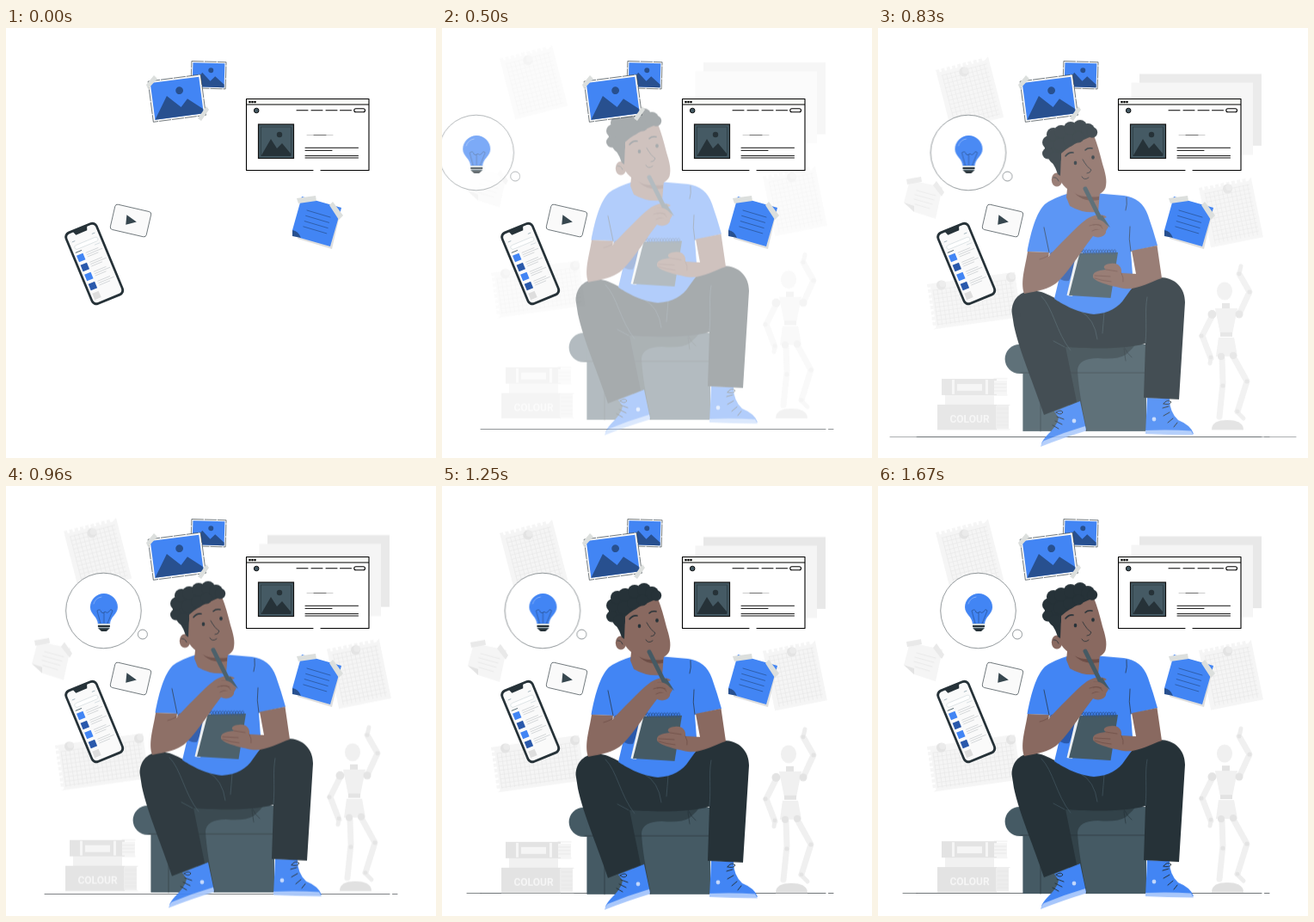
Write an HTML page that moves like this. It is 500 by 500 pixels and loops after 1710 ms.

```html
<!DOCTYPE html>
<html lang="en">
<head>
<meta charset="utf-8">
<title>Ideas</title>
<style>
  html, body { margin: 0; width: 100%; height: 100%; overflow: hidden; background: #fff; }
  svg { display: block; width: 500px; height: 500px; }
  .ln { fill: none; stroke-linecap: round; stroke-linejoin: round; }
  .book { font: bold 12px Roboto, 'Open Sans', sans-serif; font-stretch: 75%; }
</style>
</head>
<body>
<svg id="stage" viewBox="0 0 500 500" xmlns="http://www.w3.org/2000/svg"></svg>
<script>
const LOOP = 1710;
const BLUE = '#4285f4', DEEP = '#2a59ab', NAVY = '#28508f';
const INK = '#263238', SLATE = '#455a64', SKIN = '#896960', SHADE = '#6c4d46';
const PALE = '#f5f5f5', GRAY = '#e3e3e3', TAPE = '#dcdfdd';

// Markup helpers
const path = (d, fill, more = '') => `<path d="${d}" fill="${fill}" ${more}/>`;
const line = (d, color, w = 0.7, more = '') =>
  `<path class="ln" d="${d}" stroke="${color}" stroke-width="${w}" ${more}/>`;
const rect = (x, y, w, h, fill, more = '') =>
  `<rect x="${x}" y="${y}" width="${w}" height="${h}" fill="${fill}" ${more}/>`;
const dot = (x, y, r, fill, more = '') => `<circle cx="${x}" cy="${y}" r="${r}" fill="${fill}" ${more}/>`;
const oval = (x, y, rx, ry, fill) => `<ellipse cx="${x}" cy="${y}" rx="${rx}" ry="${ry}" fill="${fill}"/>`;
const at = (x, y, deg, body) => `<g transform="translate(${x} ${y}) rotate(${deg})">${body}</g>`;
const layer = (id, body) => `<g id="${id}">${body}</g>`;
const times = (n, f) => Array.from({ length: n }, (_, i) => f(i)).join('');

// Squared paper with a torn edge on the top or the left
function paper(x, y, w, h, deg, side) {
  const step = 6.4, n = Math.floor((side === 'top' ? w : h) / step);
  const torn = times(n, i => {
    const a = (i * step).toFixed(1), b = (i * step + 4).toFixed(1);
    return side === 'top' ? `L${a} 0L${b} 0L${b} 3.5L${+a + step} 3.5` : `L0 ${a}L0 ${b}L3.5 ${b}L3.5 ${+a + step}`;
  });
  const d = side === 'top' ? `M0 0${torn}L${w} 0V${h}H0Z` : `M0 0${torn}L0 ${h}H${w}V0Z`;
  let grid = '';
  for (let v = 8; v < h - 3; v += 5) grid += `M6 ${v}H${w - 4}`;
  for (let u = 6; u < w - 3; u += 5) grid += `M${u} 8V${h - 4}`;
  return at(x, y, deg, path(d, PALE) + line(grid, '#e8e8e8', 0.6));
}

const pin = (x, y) => dot(x, y, 5.5, GRAY) + dot(x + 1.5, y - 1.5, 3.8, '#ebebeb');

// Picture centred on the origin
function picture(w, h, edge, sun) {
  const x = w / 2, y = h / 2;
  return rect(-x - edge, -y - edge, w + 2 * edge, h + 2 * edge, '#f7f7f7',
      `stroke="${INK}" stroke-width=".6" stroke-dasharray="14 1"`) +
    rect(-x, -y, w, h, BLUE) +
    path(`M${-x} ${y}L${-x * .4} ${-y * .2}L${x * .12} ${y * .5}L${x * .42} ${y * .1}L${x} ${y * .75}V${y}Z`, NAVY) +
    dot(w * .07, -h * .2, sun, NAVY);
}

const papers =
  rect(304, 59.5, 142, 83.5, '#e8e8e8') + rect(294.5, 69.5, 141.5, 84, PALE) +
  paper(67, 55, 63, 73, -14.5, 'top') + pin(100, 57) +
  paper(57, 304, 103, 53, -8, 'left') + pin(73.5, 305) + pin(154.5, 296) +
  paper(373, 192, 62, 71, -11.5, 'top') + pin(406.5, 193) +
  path('M37 183L75 191L67 228L42 220L30 209Z', PALE) + path('M30 209L42 213L42 220Z', GRAY) +
  line('M45 195l22 6M43 200l22 6M42 205l21 6M43 211l17 5', '#e6e6e6') +
  path('M33 182L50 179L51 185L34 188Z M68 184L77 197L74 202L64 189Z', '#e9e9e9');

const books =
  rect(74, 414, 64, 19, GRAY) + rect(86, 415, 3, 17, PALE) + rect(92, 420, 29, 8, PALE) + rect(125, 415, 3, 17, PALE) +
  rect(135, 416, 15, 16, PALE) + line('M135 420h14M135 424h14M135 428h14M135 414h15M135 433h15', GRAY) +
  rect(78, 433, 57, 11, '#f1f1f1') +
  rect(69, 444, 69, 29.5, GRAY) + rect(137, 445, 15, 27, '#ededed') +
  line('M138 444.5h15M138 473h15M139 449h12M139 454h12M139 459h12M139 464h12M139 468h12', GRAY) +
  `<text class="book" x="106.5" y="464.5" text-anchor="middle" fill="#f6f6f6">COLOUR</text>`;

const mannequin =
  line('M420 339L432 313L420 292M388 342L377 364L387 390M400 390L401 419L397 458M413 388L429 417L418 452', '#f0f0f0', 7) +
  line('M420 292l2 -9M387 390l-1 6M417 452l8 8', '#ededed', 5) +
  path('M388 473.5C388 465 395 462 406 462S425 465 425 473.5Z', '#e0e0e0') +
  oval(403, 312, 9, 10.5, '#f0f0f0') + rect(400, 326, 9, 7, GRAY) +
  path('M392 332H418L412 362Q405 366 398 362Z', '#f0f0f0') + rect(398, 360, 14, 5, GRAY) +
  path('M396 366H414L418 388H393Z', '#f0f0f0') +
  [[388.5, 339, 5], [420, 339, 4.5], [432, 313, 2.6], [420, 292, 2.4], [376, 364, 2.6], [387, 389, 2.4],
   [399, 388, 4], [413, 387, 4], [401, 422, 2.6], [429, 417, 2.6], [418, 452, 2.3]].map(p => dot(...p, GRAY)).join('');

const couch =
  rect(147.6, 374, 60, 34, SLATE, 'rx="17"') + rect(168.4, 374, 143.6, 101, SLATE) +
  path('M216 376L303 370Q296 379 288 386Q278 392 256 390Q233 390 232 404Q233 428 243 475H225Z', '#324249') +
  line('M166 407H311M189 407V475M286 377q4 8 9 12M286 379q1 8 2 14', INK, 0.6);

const shoes =
  path('M205 452L235 440L242 473Q215 481 190 490Q190 486 202 474Q209 466 210 459Z', BLUE) +
  path('M189 493Q190 488 193 486Q217 476 241 469L242 474.500Q214 483 189 493Z', '#a8c7fb') +
  path('M313 436L339 437Q339 453 349 462Q364 468 367 478H311Z', BLUE) +
  path('M311 474Q340 473 364 474.500L367 479.500Q336 479 311 478Z', '#a8c7fb') +
  dot(228, 463, 2.4, '#c3d8fc') + dot(321, 461, 2.4, '#c3d8fc') +
  line('M208 458l8 3M206 463l8 4M203 468l7 4M207 453q6 -4 8 0q-3 4 -8 0M338 446l-7 2M339 453l-7 4M343 460l-6 5M348 465l-4 5M332 443q4 -6 9 -2q-2 4 -9 2', INK, 1);

const pants =
  path('M155.500 336C156 317 171 308 190 313C208 319 226 335 251 338C268 337 281 328 290 314C300 303 311 296 325 296C345 295 357 308 357 325L350 438L309 436L311 373C288 380 243 379 218 377L231 441L193 456C183 425 164 381 158 352Z', INK) +
  line('M190 318C204 332 207 360 224 381M235 335Q252 344 255 368M263 337Q262 350 261 361M313 319C310 335 313 350 311 372M217 377l-13 -7', SLATE, 0.7);

const body =
  path('M173.500 266C178 242 184 221 194 211Q203 204 221 198.500H257L286 201C300 203 309 210 314 224Q320 241 325 259L294 266L297 306Q292 313 287 320C280 331 268 338 251 339C230 337 213 326 205 321L210 300L199 267Z', BLUE) +
  path('M209 296L244 252L235 270L222 300Q214 301 209 296Z', DEEP) +
  line('M289 203Q290 212 288 218M193 238L199 267M294 266Q291 252 293 237', INK, 0.7) +
  path('M221 184L219 203L223 213Q238 222 256 220L258 197Z', SKIN) +
  path('M224 192Q238 205 257 202L257 206Q235 210 224 192Z', SHADE);

const arms =
  path('M231 267L238 267L226 318L219.500 317Z', '#eceff1') +
  path('M234.500 268L279 267L270.500 320L222 317Z', SLATE) +
  line(times(13, i => `M${235 + i * 3.3} 268q-2 -4 1 -4q2 1 0 5`), NAVY, 0.8) +
  path('M295 265L324.500 259L330 297C317 301 302 311 286 309C270 306 252 301 250 296C249 290 255 288 265 287C260 284 264 280 271 280C279 279 284 284 283 291L300 292Z', SKIN) +
  line('M252 294l18 1M252 297q8 3 19 4M265 287l13 2M283 291q3 6 2 10', SHADE, 0.7) +
  path('M174 266L199 267L198 272C214 255 232 236 243 228C252 222 262 222 266 226L259 229L268 237C267 240 265 240 265 244C263 249 256 251 250 248C238 263 222 290 207 303C199 309 187 312 170 315C165 301 172 281 174 266Z', SKIN) +
  line('M188 275Q197 273 202 267M246 236q8 -3 14 0M249 242q8 -4 15 -1M251 229l8 0', SHADE, 0.7) +
  line('M241 193L258 227', SLATE, 5) + path('M255 227L261 224L270 238Z', SLATE) +
  line('M249 231q8 -2 13 3q4 4 1 7M252 238q6 -1 9 3', SKIN, 4) + line('M250 235q8 -2 11 4', SHADE, 0.6);

const head =
  oval(208, 182.5, 6.2, 8, SKIN) +
  path('M208 160C212 143 228 132 251 131C255 141 258 152 261 164C264 174 267 183 264.500 192C260 203 241 205 230 199C218 194 211 185 210 177Z', SKIN) +
  path('M193 150L198 127L246 120L253 130C243 135 226 140 213 152L212 178L209 176Q205 162 193 154Z', INK) +
  [[197.5, 152, 6.5], [198.5, 139, 7.5], [204, 130, 8], [213, 127, 8], [224, 123, 8], [235, 121, 8], [244, 125, 8],
   [249, 127.5, 6.2], [206, 157, 7], [212, 142, 8], [222, 137, 7], [233, 133, 6.5]].map(p => dot(...p, INK)).join('') +
  line('M218 155q4 -5 9 -4M241 148q3 -3 8 -2', INK, 1.6) +
  oval(229.5, 163, 1.8, 2.3, INK) + oval(250, 156.500, 1.8, 2.3, INK) +
  line('M238 159Q243 168 248 171Q247 175 243 175M237 179Q240 184 245 180M204 180q4 -1 6 4', INK, 0.8);

const thin = `stroke="${INK}" stroke-width=".5"`;
const bulb =
  dot(116.5, 145, 43.8, '#fff', thin) + dot(162, 172.5, 5.5, '#fff', thin) +
  path('M101 141A16 16 0 1 1 133 141C133 149 124 152 124 161H110C110 152 101 149 101 141Z', BLUE) +
  line('M113 160L109 145q4 -3 5 2q3 2 4 -1q3 3 5 0q2 -4 4 -1L121 160M117 147V159', NAVY, 0.7) +
  line('M105 137q2 -7 9 -8', '#7facf8', 1) +
  rect(110, 160, 14, 2, '#cfd8dc') + rect(110, 162, 14, 2, INK) + rect(110.5, 164.5, 13, 1.6, SLATE) +
  path('M111 166H123L120 169H114Z', INK);

const phone = at(102.7, 274, -22.5,
  rect(-20.5, -46, 41, 92, INK, 'rx="6.5"') + rect(-17.8, -43.2, 35.6, 86.4, '#fafafa', 'rx="4.500"') +
  path('M-9 -44H9L7 -39H-7Z', INK) +
  line('M-14 -33h3M11 -33h3', '#90a4ae') + rect(-14, -28, 29, 5, '#fff', 'rx="2.5" stroke="#cfd8dc" stroke-width=".6"') +
  line('M-15 -20h7', SLATE, 0.8) + line('M9 -20h6', '#cfd8dc') +
  times(5, i => {
    const y = -16.4 + i * 11.9, c = i === 4 ? '#dedede' : i % 2 ? DEEP : BLUE;
    return rect(-15.6, y, 8, 8, c) + (i < 4 ? line(`M-4 ${y + 1}h15M-4 ${y + 3.5}h19M-4 ${y + 6}h13`, '#cfd3d5', 0.8) : '');
  }));

const video = at(145, 224, 13,
  rect(-21.5, -15, 43, 30, '#fafafa', `rx="3" stroke="${INK}" stroke-width=".6"`) + path('M-6 -5.500L7 0L-4.500 6Z', '#37474f'));

const photos =
  at(235.5, 54.7, 1.8, picture(37, 28, 1.6, 3)) +
  at(198.8, 81.7, -7.5, picture(57, 43, 2.3, 4.4)) +
  path('M163 66L172 55L176 59L165 71Z M223 105L233 91L236 95L227 108Z', TAPE);

const browser =
  rect(279.5, 82.5, 142.5, 83, '#fff') + rect(280, 83, 142, 6, '#fafcf8') +
  line('M357 165.500H279.500V82.500H422V165.500H366M279.500 89H422', '#000', 1.1) +
  [283.5, 286.5, 289.5].map(x => dot(x, 86, 1.3, '#000')).join('') +
  dot(291.2, 96, 2.8, SLATE, 'stroke="#000" stroke-width=".9"') +
  line('M338 95.700h13M355 95.700h13M372 95.700h13M388.500 95.700h13', '#000', 1.1) +
  rect(404.8, 93.7, 12.7, 4, '#fff', 'rx="2" stroke="#000" stroke-width="1.1"') +
  rect(293.5, 112, 41, 39.5, SLATE, 'stroke="#111" stroke-width="1.2"') +
  rect(296.5, 115, 35, 33.5, 'none', `stroke="${INK}" stroke-width=".6"`) +
  path('M297 148L308 129L315 140L321 134L331 146V149H297Z', INK) + dot(318, 124, 3.2, INK) +
  line('M350 124.500h30', '#aaa', 0.6) + line('M358 124.500h14', '#333', 0.6) +
  line('M348 139.300h61.500M348 142.400h31M348 148.600h61.500M348 151h61.500', '#111', 1);

const sticky =
  path('M345 197L390 209L379 257L339 245Z', '#dedede') +
  path('M344 196L390 209L377 254L342 244L333 235Z', BLUE) + path('M333 235Q340 236 343 244L333 242Z', NAVY) +
  line(times(4, i => `M${350 - i * 1.4} ${212 + i * 6.3}l27 8`), NAVY, 0.7) +
  path('M338 198L360 195L361 201L340 204Z M380 202L392 218L387 223L376 206Z', TAPE);

const floor =
  line('M45 473.500H446M449.500 473.500H455', '#4d5457', 0.8) +
  layer('near', line('M29 473.500H45', '#4d5457', 0.7)) +
  layer('far', line('M14 473.500H45M446 473.500H486', '#8a8f91', 0.7));

document.getElementById('stage').innerHTML =
  layer('floor', floor) +
  layer('back', papers + books + mannequin) +
  layer('bulb', bulb) +
  layer('man', couch + shoes + pants + body + head + arms) +
  phone + video + photos + browser + sticky;

// Steps: time in ms, offset in px, opacity
const drop = [[0, -30, 0], [170, -30, 0], [330, -26, .16], [500, -19.5, .41], [670, -12.2, .66], [830, -6.2, .86],
  [950, -2.6, .95], [1080, -.2, 1], [1420, -.2, 1], [1670, -.9, 1], [LOOP, -.9, 1]];
const glide = [[0, -200, 0], [170, -194, 0], [330, -131, .4], [500, -77, .69], [670, -39, .84], [750, -24, .91],
  [830, -11.6, .96], [950, -3.5, 1], [1080, .2, 1], [1250, .4, 1], [1420, .2, 1], [LOOP, 0, 1]];
const settle = [[0, -40, 0], [170, -40, 0], [330, -22, .4], [500, -7, .8], [670, 0, .95], [750, 1.6, 1],
  [830, 2, 1], [950, 1.2, 1], [1080, 0, 1], [LOOP, 0, 1]];

function play(id, frames) {
  document.getElementById(id).animate(frames, { duration: LOOP, iterations: Infinity });
}
const move = (id, axis, steps) => play(id, steps.map(([t, d, opacity]) =>
  ({ offset: t / LOOP, transform: `translate${axis}(${d}px)`, opacity })));
const show = (id, from, to) => play(id, [[0, 0], [from, 0], [from, 1], [to, 1], [to, 0], [LOOP, to < LOOP ? 0 : 1]]
  .map(([t, opacity]) => ({ offset: t / LOOP, opacity })));

move('back', 'Y', drop);
move('man', 'Y', drop);
move('bulb', 'X', glide);
move('floor', 'Y', settle);
show('near', 1060, LOOP);
show('far', 710, 960);
</script>
</body>
</html>
```
